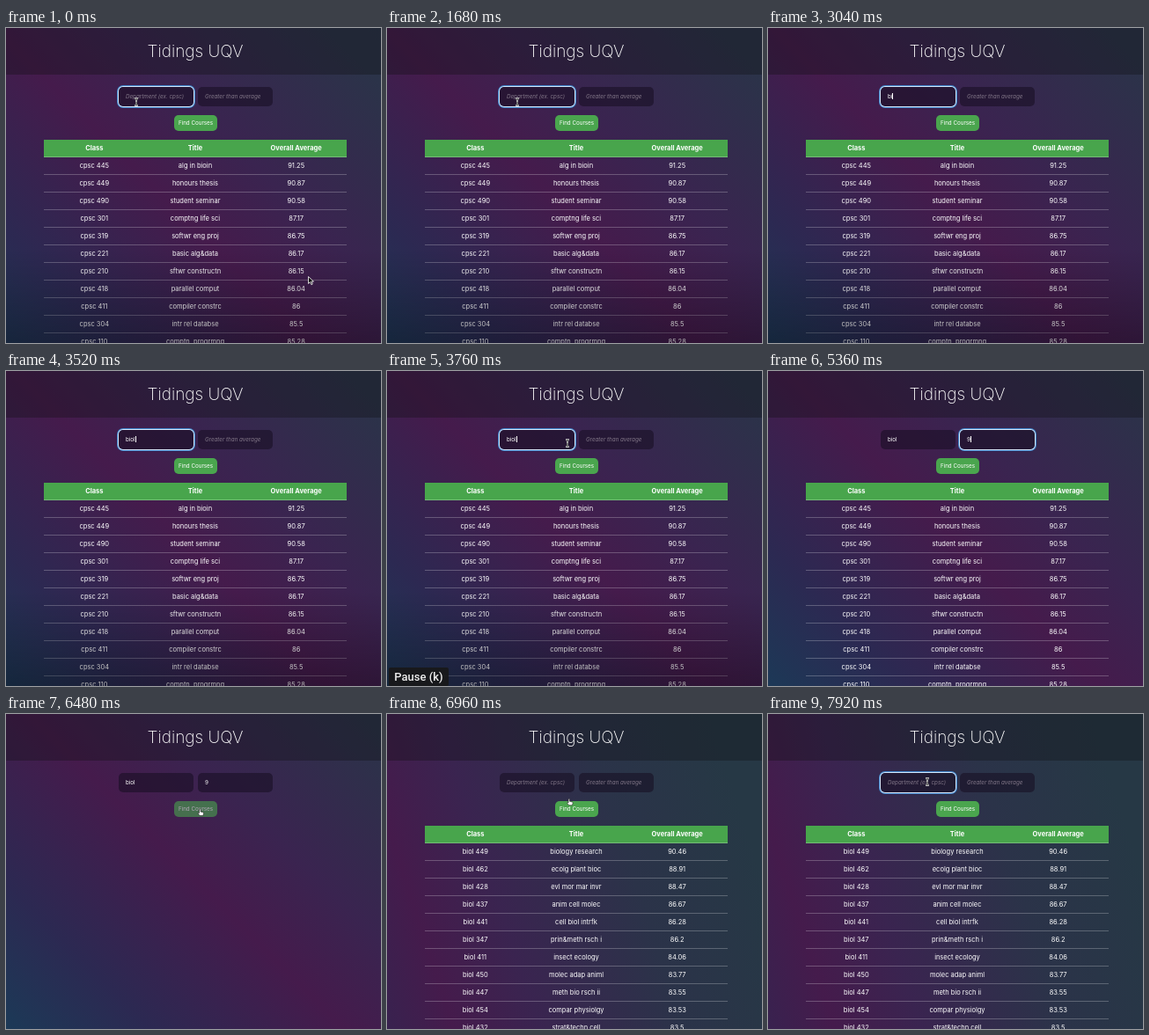
These frames come from a looping animation (426 px wide and 358 px high, 8 s). An HTML page:

```html
<!DOCTYPE html>
<html lang="en">
<head>
<meta charset="utf-8">
<title>Course finder</title>
<style>
html, body { margin: 0; width: 100%; height: 100%; overflow: hidden; }
#stage { position: relative; width: 426px; height: 358px; overflow: hidden; color: #fff; font: 7.5px Inter, "Open Sans", sans-serif; }
#stage > * { position: absolute; box-sizing: border-box; }
header { left: 0; top: 0; width: 426px; height: 53px; padding-left: 4px; background: rgba(16, 16, 20, .34); font-size: 19px; font-weight: 200; line-height: 54px; text-align: center; }
.field { top: 67px; width: 85px; height: 22px; padding-left: 8px; border-radius: 5px; background: rgba(22, 14, 32, .56); font-size: 6.25px; line-height: 22px; white-space: pre; }
.field.empty { color: #837889; font-style: italic; }
.field.focus { box-shadow: 0 0 0 1px #d5e8fc, 0 0 0 2px #3c7fc4; }
.caret::after { content: ""; display: inline-block; width: .6px; height: 7px; background: #fff; vertical-align: -1px; }
#find { left: 191px; top: 99px; width: 49px; height: 18px; border-radius: 5px; background: #4aa54e; font-size: 6.25px; line-height: 18px; text-align: center; }
#table { left: 43px; top: 127px; width: 344px; }
.row { display: grid; grid-template-columns: repeat(3, 1fr); box-sizing: border-box; height: 20px; line-height: 20px; text-align: center; border-bottom: 1px solid rgba(255, 255, 255, .24); }
.row.head { background: #48a54c; font-weight: 700; }
#shade { left: 0; top: 250px; width: 426px; height: 108px; background: linear-gradient(transparent, rgba(0, 0, 0, .3)); }
#tip { left: 2px; top: 337px; width: 68px; height: 21px; border-radius: 2px; background: rgba(24, 24, 26, .92); color: #eee; font: 500 13px/21px Roboto, sans-serif; text-align: center; }
#mouse { left: 0; top: 0; width: 426px; height: 358px; }
#mouse path { stroke-linejoin: round; }
</style>
</head>
<body>
<div id="stage">
  <header>Tidings UQV</header>
  <div class="field" id="dept" style="left:128px"></div>
  <div class="field" id="avg" style="left:218px"></div>
  <div id="find">Find Courses</div>
  <div id="table"></div>
  <div id="shade"></div>
  <div id="tip">Pause (k)</div>
  <svg id="mouse">
    <path id="arrow" d="M343.500 282.500v8l2-1.800 1.400 3 1.400-.7-1.400-2.900h2.600z" fill="#111" stroke="#fff" stroke-width=".8"/>
    <g id="beam" fill="none">
      <path d="M-2-4Q0-4 0-2.500Q0-4 2-4M0-3V3M-2 4Q0 4 0 2.500Q0 4 2 4M-1 1H1" stroke="#fff" stroke-width="2"/>
      <path d="M-2-4Q0-4 0-2.500Q0-4 2-4M0-3V3M-2 4Q0 4 0 2.500Q0 4 2 4M-1 1H1" stroke="#222" stroke-width=".8"/>
    </g>
    <path id="hand" d="M-1.500-3.500q.8-.8 1.500 0v2.500l2.800.7q1 .3.700 1.500l-.7 2.300h-3.600l-2.400-2.800q0-1 1.700 0z" fill="#fff" stroke="#222" stroke-width=".6"/>
  </svg>
</div>
<script>
const LOOP = 8000, CLICK = 6240, LOADED = 6800;
const $ = id => document.getElementById(id);
const show = (id, on) => { $(id).style.display = on ? "" : "none"; };
const between = (t, a, b) => t >= a && t < b;

const makeRows = text => "Class,Title,Overall Average;" + text;
const tables = [
  "cpsc 445,alg in bioin,91.25;cpsc 449,honours thesis,90.87;cpsc 490,student seminar,90.58;cpsc 301,comptng life sci,87.17;cpsc 319,softwr eng proj,86.75;cpsc 221,basic alg&data,86.17;cpsc 210,sftwr constructn,86.15;cpsc 418,parallel comput,86.04;cpsc 411,compiler constrc,86;cpsc 304,intr rel databse,85.5;cpsc 110,comptn, progrmng,85.28",
  "biol 449,biology research,90.46;biol 462,ecolg plant bioc,88.91;biol 428,evl mor mar invr,88.47;biol 437,anim cell molec,86.67;biol 441,cell biol intrfk,86.28;biol 347,prin&meth rsch i,86.2;biol 411,insect ecology,84.06;biol 450,molec adap animl,83.77;biol 447,meth bio rsch ii,83.55;biol 454,compar physiolgy,83.53;biol 432,strat&techn cell,83.5"
].map(text => makeRows(text).split(";").map((line, i) => {
  const cells = line.split(/,(?! )/);
  return `<div class="row${i ? "" : " head"}">` +
    cells.map(c => `<span>${c.replace("&", "&amp;")}</span>`).join("") + "</div>";
}).join(""));

let shown = -1;
function setTable(n) {
  if (n !== shown) $("table").innerHTML = tables[shown = n];
}

function setField(id, value, hint, focus) {
  const el = $(id);
  el.textContent = value || hint;
  el.className = "field" + (value ? "" : " empty") + (focus ? " focus" : "") + (focus && value ? " caret" : "");
}

// Pointer stops: time, x, y
const stops = [[0, 148, 84], [3660, 148, 84], [3760, 205, 82], [4000, 205, 82], [4240, 252, 80],
  [5440, 252, 80], [6000, 221, 112], [6860, 221, 112], [7120, 181, 77], [LOOP, 181, 77]];
function pointer(t) {
  const i = stops.findIndex(s => s[0] > t);
  const [t0, x0, y0] = stops[i - 1], [t1, x1, y1] = stops[i];
  const u = (t - t0) / (t1 - t0), k = u * u * (3 - 2 * u);
  return [x0 + (x1 - x0) * k, y0 + (y1 - y0) * k];
}

function backdrop(t) {
  const late = t >= LOADED;
  const peak = late ? 14 : 44 + t / 1300;
  const angle = late ? 72 : 45;
  return `linear-gradient(${angle}deg, #1b3a57 ${peak - 50}%, #2c2952 ${peak - 28}%, #451b4c ${peak}%, #3a2450 ${peak + 18}%, #2b3349 ${peak + 48}%, #263845 ${peak + 75}%)`;
}

function draw(now) {
  const t = now % LOOP, reset = t >= LOADED;
  $("stage").style.background = backdrop(t);

  const typed = [2800, 2960, 3200, 3440].filter(k => t >= k).length;
  setField("dept", reset ? "" : "biol".slice(0, typed), "Department (ex. cpsc)", t < 4240 || t >= 7200);
  setField("avg", between(t, 5200, LOADED) ? "9" : "", "Greater than average", between(t, 4240, CLICK));

  setTable(reset ? 1 : 0);
  show("table", !between(t, CLICK, LOADED));
  $("find").style.opacity = between(t, CLICK, LOADED) ? .6 : 1;
  show("shade", t < 4900);
  show("tip", between(t, 3680, 4640));

  const [x, y] = pointer(t);
  const hand = y > 98, hidden = between(t, 2800, 3680) || between(t, 5200, 5440);
  show("arrow", t < 560);
  show("beam", !hand && !hidden);
  show("hand", hand);
  for (const id of ["beam", "hand"]) $(id).setAttribute("transform", `translate(${x} ${y})`);
  requestAnimationFrame(draw);
}
requestAnimationFrame(draw);
</script>
</body>
</html>
```
